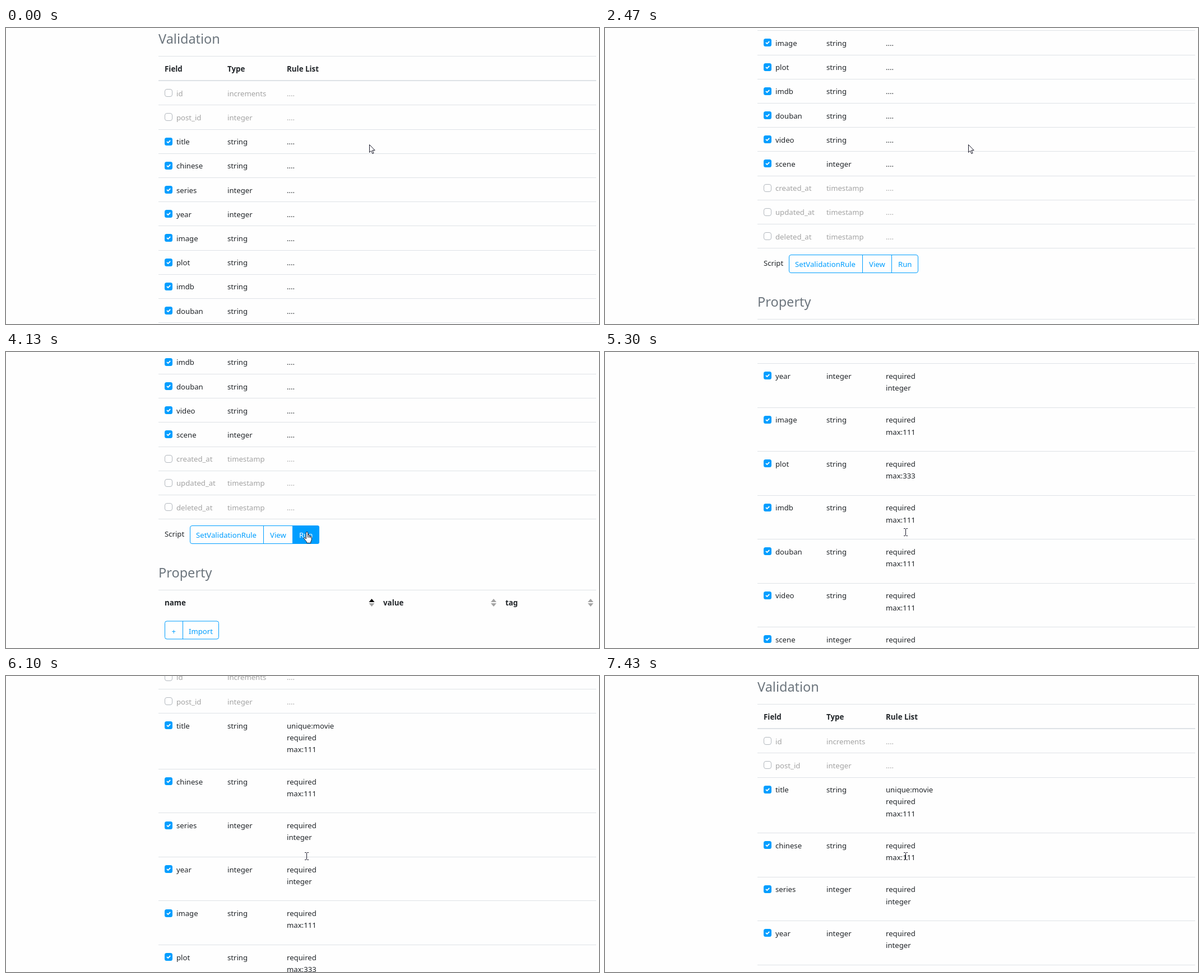
These frames come from a looping animation (1058 px wide and 529 px high, 8820 ms). An HTML page:

```html
<!DOCTYPE html>
<html lang="en">
<head>
<meta charset="utf-8">
<title>Validation rules</title>
<style>
  html, body { margin: 0; width: 100%; height: 100%; overflow: hidden; background: #fefefe; }
  svg { display: block; width: 1058px; height: 529px; }
  text { font: 13.15px "Noto Sans", "Open Sans", sans-serif; fill: #212529; }
  .bold { font-weight: 700; font-size: 13.35px; }
  .title { font-size: 23.5px; fill: #6c757d; }
  .muted { fill: #a3a3a3; }
  .blue { fill: #009eff; }
  .white { fill: #fff; }
  .line { fill: #dee2e6; }
  .outline { fill: none; stroke: #009eff; }
  .box { fill: #fff; stroke: #b2b8be; }
  .tick { fill: none; stroke: #fff; stroke-width: 1.8; }
  .cursor path { fill: #fff; stroke: #1c1c2c; stroke-linejoin: round; }
</style>
</head>
<body>
<svg viewBox="0 0 1058 529">
  <g id="page"></g>
  <g id="cursor" class="cursor">
    <path id="arrow" d="M.5.5V14.3L3.6 11.4 5.9 16.6 8 15.7 5.8 10.6H10.2Z"/>
    <g id="hand">
      <path d="M-.6 12V1.4Q-.6 -.5 1-.5T2.5 1.4V6.2Q4-.1 5 6.9 6.6 6 7.1 7.8 9.2 7.2 9.2 9.6V13.2Q9.2 15 7.8 16.8V19.3H.6V17.4Q-1.6 15.4-4.3 11.3-4.9 9.4-3.2 9.5-2 9.8-.6 12Z"/>
      <path d="M2.5 6V9.6M4.9 7V10M7.1 8V10.4"/>
    </g>
    <path id="beam" style="fill:none" d="M-3-6.5H-.5L.5-5.5 1.5-6.5H4M.5-5.5V5.5M-3 6.5H-.5L.5 5.5 1.5 6.5H4"/>
  </g>
</svg>
<script>
const LOOP = 8820;
const $ = id => document.getElementById(id);

const MAX = ['required', 'max:111'], INT = ['required', 'integer'];
// name, type, rules (none for fields that are not editable)
const fields = [
  ['id', 'increments'], ['post_id', 'integer'],
  ['title', 'string', ['unique:movie', ...MAX]], ['chinese', 'string', MAX],
  ['series', 'integer', INT], ['year', 'integer', INT],
  ['image', 'string', MAX], ['plot', 'string', ['required', 'max:333']],
  ['imdb', 'string', MAX], ['douban', 'string', MAX],
  ['video', 'string', MAX], ['scene', 'integer', INT],
  ['created_at', 'timestamp'], ['updated_at', 'timestamp'], ['deleted_at', 'timestamp']
];

// Text and boxes snap to whole pixels after scrolling, as in a browser
const text = (x, y, s, cls = '') => `<text x="${x}" y="${Math.round(y)}" class="${cls}">${s}</text>`;
const line = (y, h = 1) => `<rect class="line" x="272" y="${Math.floor(y)}" width="781" height="${h}"/>`;
const path = (d, cls) => `<path class="${cls}" d="${d}"/>`;

function checkbox(y, on) {
  const rect = (x, y, size, cls) =>
    `<rect class="${cls}" x="${x}" y="${y}" width="${size}" height="${size}" rx="3.5"/>`;
  return on
    ? rect(283, y - 7, 14, 'blue') + path(`M287 ${y}l2.2 2.1 4-4.1`, 'tick')
    : rect(283.5, y - 6.5, 13, 'box');
}

function buttons(x, y, width, dividers) {
  return `<rect class="outline" x="${x}" y="${y}" width="${width}" height="32" rx="3.5"/>` +
    dividers.map(d => path(`M${d} ${y}v32`, 'outline')).join('');
}

function sorter(x, y, active) {
  return path(`M${x - 5} ${y - 2}l5-6 5 6z`, active ? '' : 'muted') +
    path(`M${x - 5} ${y}l5 6 5-6z`, 'muted');
}

function page(scroll, ruled, hover) {
  const top = -scroll;
  let y = top + 94.62;
  let out = text(272, top + 28, 'Validation', 'title') + line(top + 50.4) +
    text(283, top + 78, 'Field', 'bold') + text(395, top + 78, 'Type', 'bold') +
    text(501, top + 78, 'Rule List', 'bold') + line(y - 1, 2);

  for (const [name, type, rules] of fields) {
    const cls = rules ? '' : 'muted', middle = y + 22.1, base = middle + 5;
    const list = ruled && rules || ['....'];
    out += checkbox(Math.floor(middle), rules) +
      text(304, base, name, cls) + text(395, base, type, cls);
    list.forEach((rule, i) => out += text(501, base + i * 21.3, rule, cls));
    y += 43.2 + (list.length > 1 ? 14 + 21.3 * (list.length - 1) : 0);
    out += line(y);
  }

  y = Math.floor(y);
  out += text(283, y + 32, 'Script') + buttons(328.5, y + 12.5, 230, [459.5, 511.5]);
  if (hover) out += path(`M511.5 ${y + 12}h44q3.5 0 3.5 3.5v26q0 3.5-3.5 3.5h-44z`, 'blue');
  return out +
    text(339, y + 34, 'SetValidationRule', 'blue') + text(471, y + 34, 'View', 'blue') +
    text(523, y + 34, 'Run', hover ? 'white' : 'blue') +
    text(272, y + 105, 'Property', 'title') + line(y + 127) +
    text(283, y + 155, 'name', 'bold') + sorter(652.5, y + 151, true) +
    text(673, y + 155, 'value', 'bold') + sorter(870, y + 151) +
    text(891, y + 155, 'tag', 'bold') + sorter(1043, y + 151) +
    buttons(283.5, y + 183, 96, [315.5]) +
    text(295.5, y + 206, '+', 'blue') + text(326, y + 206, 'Import', 'blue');
}

// Wheel gestures: first step, last step, step count, start, end, skew of the easing
const scrolls = [
  [1930, 2240, 5, 0, 333, 1.28],
  [2390, 2790, 6, 333, 444, 1.304],
  [5300, 6180, 12, 444, 111, 0.703],
  [7030, 7430, 6, 111, 0, 0.86]
];

const smooth = p => p * p * (3 - 2 * p);

// Progress in equal time steps; already one step in at the first time
function stepped(t, first, last, count) {
  if (t < first) return 0;
  const k = Math.floor((t - first) / (last - first) * (count - 1) + 1e-6) + 1;
  return Math.min(k / count, 1);
}

function scrollAt(t) {
  let y = 0;
  for (const [first, last, count, from, to, skew] of scrolls)
    if (t >= first) y = from + (to - from) * smooth(stepped(t, first, last, count) ** skew);
  return y;
}

function cursorAt(t) {
  if (t < 4050) return 'arrow';
  if (t < 4600) return 'hand';
  return t >= 6180 && t < 7430 ? 'arrow' : 'beam';
}

let shown = '';
function draw(t) {
  const ruled = t >= 4520, shape = cursorAt(t);
  const state = [scrollAt(t), ruled, t >= 4050 && !ruled];
  if (state.join() !== shown) {
    shown = state.join();
    $('page').innerHTML = page(...state);
  }

  for (const id of ['arrow', 'hand', 'beam'])
    $(id).setAttribute('display', id === shape ? 'inline' : 'none');
  const p = smooth(stepped(t, 3490, 4130, 9));
  const shift = shape === 'arrow' && t > 4600 ? -1 : 0;
  const x = Math.round(648 - 112 * p) + shift, y = Math.round(208 + 114 * p) + shift;
  $('cursor').setAttribute('transform', `translate(${x} ${y})`);
}

const start = performance.now();
function tick() {
  draw((performance.now() - start) % LOOP);
  requestAnimationFrame(tick);
}
tick();
</script>
</body>
</html>
```
